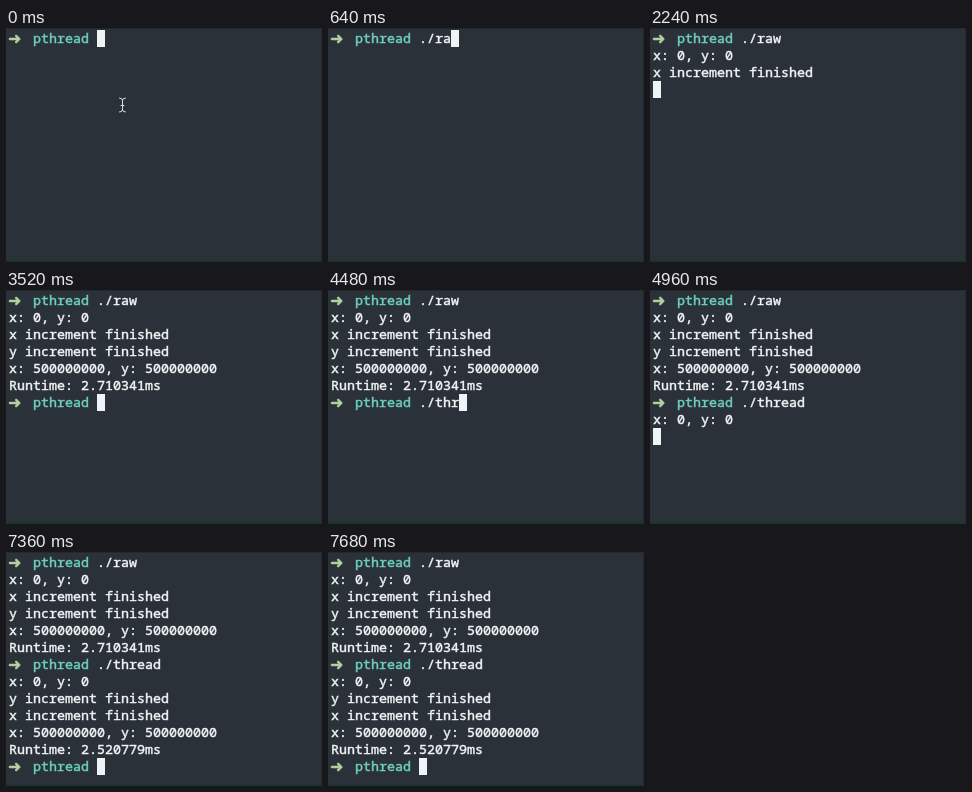
Recreate the animation shown at these times as an HTML page. Size 316 px wide and 234 px high, loop 7.84 s.

```html
<!DOCTYPE html>
<html lang="en">
<head>
<meta charset="utf-8">
<title>Terminal session</title>
<style>
  html, body { margin: 0; width: 100%; height: 100%; overflow: hidden; background: #2b3138; }
  #stage { position: relative; width: 316px; height: 234px; overflow: hidden; background: #2b3138; }
  #stage::before { content: ""; position: absolute; inset: 0; border: solid #23292f; border-width: 1px 1px 0 0; }
  #stage::after { content: ""; position: absolute; inset: 232px 0 0; background: #1d3529; }
  #text {
    position: absolute; left: 3px; top: 2px; margin: 0; color: #f1f4f5;
    font: 13.333px/17px "Noto Sans Mono", "DejaVu Sans Mono", monospace;
    -webkit-text-stroke: 0.45px;
  }
  .arrow { position: absolute; left: -1px; color: #b3d3a0; font: 16px/17px "DejaVu Sans", sans-serif; }
  .dir { color: #6dd0bd; }
  #cursor { position: absolute; width: 8px; height: 17px; background: #eff4f6; }
  #pointer { position: absolute; left: 112px; top: 69px; }
</style>
</head>
<body>
<div id="stage">
  <pre id="text"></pre>
  <div id="cursor"></div>
  <svg id="pointer" width="9" height="16" fill="none" stroke-linecap="round">
    <path d="M1.5 1Q4.5 1 4.5 3.5Q4.5 1 7.5 1M4.5 3V13M1.5 15Q4.5 15 4.5 12.5Q4.5 15 7.5 15M3 8.5H6" stroke="#d9dee0"/>
  </svg>
</div>
<script>
const LOOP = 7840, LEFT = 3, TOP = 2, CELL = 8, LINE = 17;
const PROMPT = "➜  pthread ";
const TOTALS = "x: 500000000, y: 500000000\n";

// Terminal output: [time in ms, text appended]
const events = [
  [0, PROMPT],
  [480, "./"],
  [640, "ra"],
  [800, "w"],
  [960, "\nx: 0, y: 0\n"],
  [2240, "x increment finished\n"],
  [3520, "y increment finished\n" + TOTALS + "Runtime: 2.710341ms\n" + PROMPT],
  [4160, "./"],
  [4480, "thr"],
  [4640, "ead "],
  [4960, "\nx: 0, y: 0\n"],
  [6240, "y increment finished\nx increment finished\n" + TOTALS + "Runtime: 2.520779ms\n" + PROMPT],
];

const [text, cursor, pointer] = ["text", "cursor", "pointer"].map(id => document.getElementById(id));
let shown = "";

function render(t) {
  const output = events.filter(([time]) => time <= t).map(([, part]) => part).join("");
  if (output === shown) return;
  shown = output;
  text.innerHTML = output.replaceAll("➜  pthread",
    '<span class="arrow">➜</span>   <span class="dir">pthread</span>');
  const lines = output.split("\n");
  cursor.style.left = LEFT + CELL * lines.at(-1).length + "px";
  cursor.style.top = TOP + LINE * (lines.length - 1) + "px";
  pointer.style.display = t < events[1][0] ? "" : "none";
}

const start = performance.now();
function frame() {
  render((performance.now() - start) % LOOP);
  requestAnimationFrame(frame);
}
frame();
</script>
</body>
</html>
```
